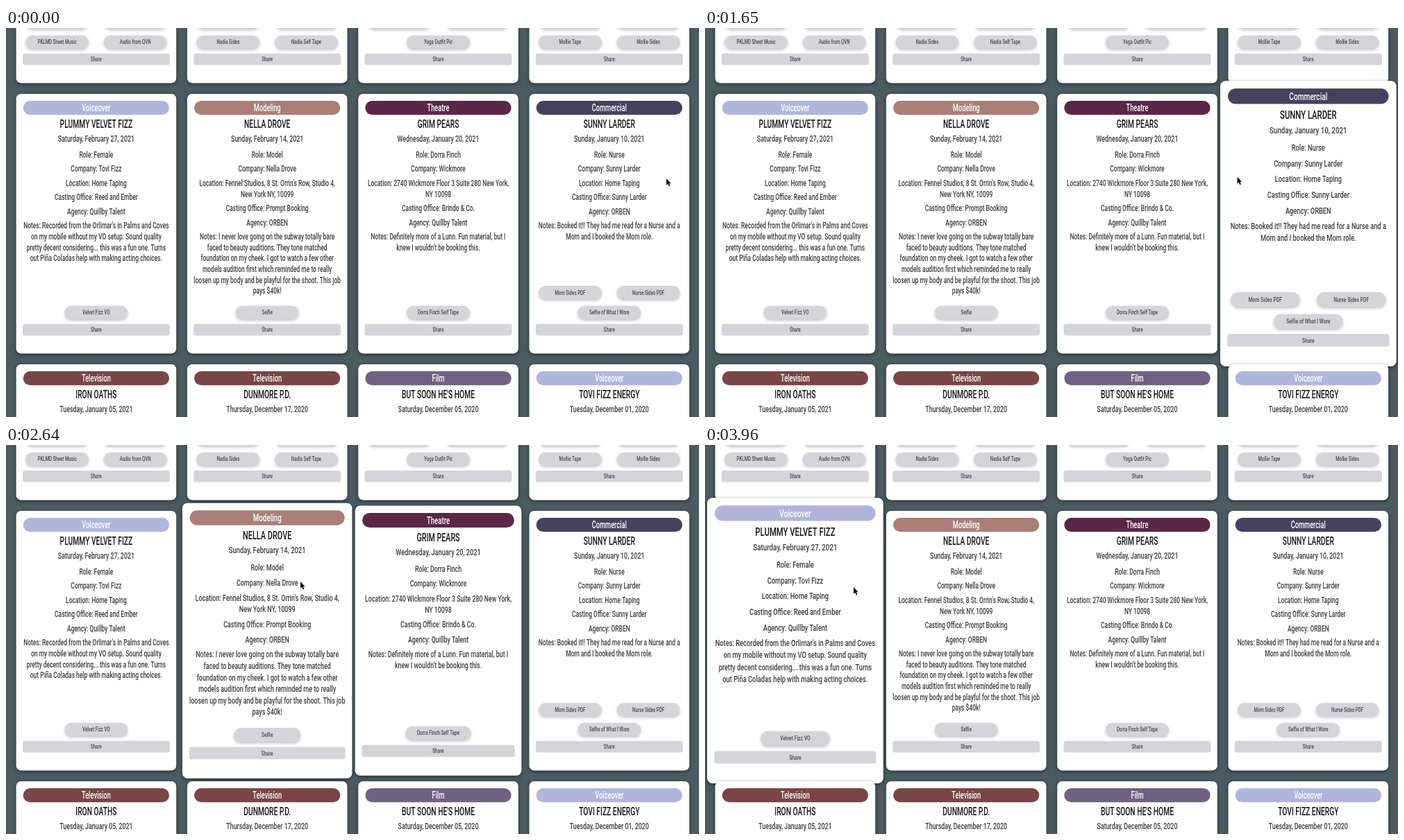
Write an HTML page with a canvas that moves like this. It is 998x561 px and loops after 4.07 s.

```html
<!DOCTYPE html>
<html lang="en">
<head>
<meta charset="utf-8">
<title>Audition cards</title>
<style>
  html, body { margin: 0; width: 100%; height: 100%; overflow: hidden; background: #4b5b60; }
  canvas { display: block; width: 998px; height: 561px; }
</style>
</head>
<body>
<canvas id="stage" width="998" height="561"></canvas>
<script>
const ctx = document.getElementById('stage').getContext('2d');
const LOOP = 4070, STEP = 110, FADE = 300;
const CARD = { w: 230.6, h: 374.4, left: 14.6, top: 95, dx: 246.3, dy: 390 };
const TONES = {
  Voiceover: '#b0b5db', Modeling: '#a97f78', Theatre: '#5a2746',
  Commercial: '#45425f', Television: '#7a4548', Film: '#716285'
};
// size, weight, condensing factor and colour of each text style
const STYLES = {
  banner: [13.8, 500, 0.67, '#fff'],
  title: [15.8, 500, 0.65, '#161616'],
  date: [12, 500, 0.74, '#3d3d3d'],
  body: [12, 500, 0.705, '#3d3d3d'],
  small: [8.5, 500, 0.725, '#48484a']
};

const cards = [
  { buttons: [['', ''], ['PKLMD Sheet Music', 'Audio from QVN']] },
  { buttons: [['', ''], ['Nadia Sides', 'Nadia Self Tape']] },
  { buttons: [['', ''], ['Yoga Outfit Pic']] },
  { buttons: [['', ''], ['Mollie Tape', 'Mollie Sides']] },
  {
    kind: 'Voiceover', title: 'PLUMMY VELVET FIZZ', date: 'Saturday, February 27, 2021',
    info: ['Role: Female', 'Company: Tovi Fizz', 'Location: Home Taping',
      'Casting Office: Reed and Ember', 'Agency: Quillby Talent',
      "Notes: Recorded from the Orlimar's in Palms and Coves\non my mobile without my VO setup. Sound quality\npretty decent considering... this was a fun one. Turns\nout Piña Coladas help with making acting choices."],
    buttons: [['Velvet Fizz VO']], hover: [3665, Infinity]
  },
  {
    kind: 'Modeling', title: 'NELLA DROVE', date: 'Sunday, February 14, 2021',
    info: ['Role: Model', 'Company: Nella Drove',
      "Location: Fennel Studios, 8 St. Orrin's Row, Studio 4,\nNew York NY, 10099",
      'Casting Office: Prompt Booking', 'Agency: ORBEN',
      'Notes: I never love going on the subway totally bare\nfaced to beauty auditions. They tone matched\nfoundation on my cheek. I got to watch a few other\nmodels audition first which reminded me to really\nloosen up my body and be playful for the shoot. This job\npays $40k!'],
    buttons: [['Selfie']], hover: [2535, 3665]
  },
  {
    kind: 'Theatre', title: 'GRIM PEARS', date: 'Wednesday, January 20, 2021',
    info: ['Role: Dorra Finch', 'Company: Wickmore',
      'Location: 2740 Wickmore Floor 3 Suite 280 New York,\nNY 10098',
      'Casting Office: Brindo & Co.', 'Agency: Quillby Talent',
      "Notes: Definitely more of a Lunn. Fun material, but I\nknew I wouldn't be booking this."],
    buttons: [['Dorra Finch Self Tape']], hover: [1750, 2535]
  },
  {
    kind: 'Commercial', title: 'SUNNY LARDER', date: 'Sunday, January 10, 2021',
    info: ['Role: Nurse', 'Company: Sunny Larder', 'Location: Home Taping',
      'Casting Office: Sunny Larder', 'Agency: ORBEN',
      'Notes: Booked it!! They had me read for a Nurse and a\nMom and I booked the Mom role.'],
    buttons: [['Mom Sides PDF', 'Nurse Sides PDF'], ['Selfie of What I Wore']], hover: [635, 1750]
  },
  { kind: 'Television', title: 'IRON OATHS', date: 'Tuesday, January 05, 2021' },
  { kind: 'Television', title: 'DUNMORE P.D.', date: 'Thursday, December 17, 2020' },
  { kind: 'Film', title: "BUT SOON HE'S HOME", date: 'Saturday, December 05, 2020' },
  { kind: 'Voiceover', title: 'TOVI FIZZ ENERGY', date: 'Tuesday, December 01, 2020' }
];

// time, x, y of the pointer tip
const path = [
  [0, 951, 217], [550, 951, 217], [770, 919, 214], [1210, 874, 213], [1750, 742, 215],
  [1870, 667, 216], [2535, 498, 203], [2640, 424, 197], [3190, 310, 200],
  [3665, 249, 204], [3960, 214, 205], [4070, 210, 205]
];
// stretches of x where the pointer is above text
const textSpans = [[823, 914], [515, 731], [328, 421]];

// CSS "ease": cubic-bezier(.25, .1, .25, 1)
function ease(p) {
  if (p <= 0) return 0;
  if (p >= 1) return 1;
  const curve = (a, b, s) => 3 * a * s * (1 - s) ** 2 + 3 * b * s * s * (1 - s) + s ** 3;
  let lo = 0, hi = 1;
  for (let i = 0; i < 24; i++) {
    const mid = (lo + hi) / 2;
    if (curve(0.25, 0.25, mid) < p) lo = mid; else hi = mid;
  }
  return curve(0.1, 1, lo);
}

function zoom(card, t) {
  if (!card.hover) return 1;
  const [enter, leave] = card.hover;
  return 1 + 0.1 * (ease((t - enter) / FADE) - ease((t - leave) / FADE));
}

function box(x, y, w, h, r, fill, shadow) {
  ctx.save();
  if (shadow) [ctx.shadowColor, ctx.shadowBlur, ctx.shadowOffsetY] = shadow;
  ctx.fillStyle = fill;
  ctx.beginPath();
  ctx.roundRect(x, y, w, h, r);
  ctx.fill();
  ctx.restore();
}

// centred text; y is the middle of the capitals
function write(str, y, style, x = 0) {
  const [size, weight, narrow, color] = STYLES[style];
  ctx.save();
  ctx.translate(x, y + size * 0.355);
  ctx.scale(narrow, 1);
  ctx.font = `${weight} ${size}px Roboto, "Liberation Sans", sans-serif`;
  ctx.textAlign = 'center';
  ctx.fillStyle = color;
  ctx.fillText(str, 0, 0);
  ctx.restore();
}

function drawButtons(rows) {
  rows.forEach((row, i) => {
    const y = 315.3 - 28.7 * (rows.length - 1 - i);
    row.forEach((label, j) => {
      const x = (j - (row.length - 1) / 2) * 112.6;
      box(x - 45.2, y - 9.5, 90.4, 19, 9.5, '#d4d5d9', ['rgba(0,0,0,.25)', 4, 2]);
      write(label, y, 'small', x);
    });
  });
  box(-106, 331.8, 212, 16.6, 3.5, '#d4d5d9');
  write('Share', 340.3, 'small');
}

function drawCard(card, index, t) {
  const col = index % 4, row = Math.floor(index / 4) - 1;
  const scale = zoom(card, t);
  ctx.save();
  ctx.translate(CARD.left + CARD.w / 2 + col * CARD.dx, CARD.top + CARD.h / 2 + row * CARD.dy);
  ctx.scale(scale, scale);
  ctx.translate(0, -CARD.h / 2);
  box(-CARD.w / 2, 0, CARD.w, CARD.h, 7, '#fff', ['rgba(0,0,0,.5)', 5, 1.5]);
  if (card.kind) {
    box(-105.2, 10, 210.4, 20.2, 10.1, TONES[card.kind]);
    write(card.kind, 20.3, 'banner');
    write(card.title, 43.7, 'title');
    write(card.date, 64.3, 'date');
  }
  let y = 87.6;
  for (const entry of card.info || []) {
    const lines = entry.split('\n');
    lines.forEach((line, i) => write(line, y + i * 15.65, 'body'));
    y += 20.5 + (lines.length - 1) * 15.65;
  }
  if (card.buttons) drawButtons(card.buttons);
  ctx.restore();
}

function pointerAt(t) {
  const i = Math.max(1, path.findIndex(k => k[0] >= t));
  const a = path[i - 1], b = path[i], p = (t - a[0]) / (b[0] - a[0]);
  return [a[1] + (b[1] - a[1]) * p, a[2] + (b[2] - a[2]) * p];
}

function drawPointer(t) {
  const [x, y] = pointerAt(t);
  ctx.save();
  ctx.translate(x, y);
  if (textSpans.some(([from, to]) => x >= from && x <= to)) {
    ctx.strokeStyle = '#555';
    ctx.lineWidth = 1;
    ctx.stroke(new Path2D('M-2.5-5.5Q0-5.5 0-4V4Q0 5.5-2.5 5.5M2.5-5.5Q0-5.5 0-4M0 4Q0 5.5 2.5 5.5M-1.5 2H1.5'));
  } else {
    const arrow = new Path2D('M0 0V9.8L2.2 7.8L3.8 11.5L5.5 10.8L3.9 7.2H6.8Z');
    ctx.strokeStyle = '#fff';
    ctx.lineWidth = 1.4;
    ctx.stroke(arrow);
    ctx.fillStyle = '#111';
    ctx.fill(arrow);
  }
  ctx.restore();
}

function draw(t) {
  ctx.fillStyle = '#4b5b60';
  ctx.fillRect(0, 0, 998, 561);
  cards.forEach((card, i) => drawCard(card, i, t));
  drawPointer(t);
}

let start;
function tick(now) {
  start ??= now;
  draw(Math.floor((now - start) % LOOP / STEP) * STEP);
  requestAnimationFrame(tick);
}
draw(0);
requestAnimationFrame(tick);
</script>
</body>
</html>
```
